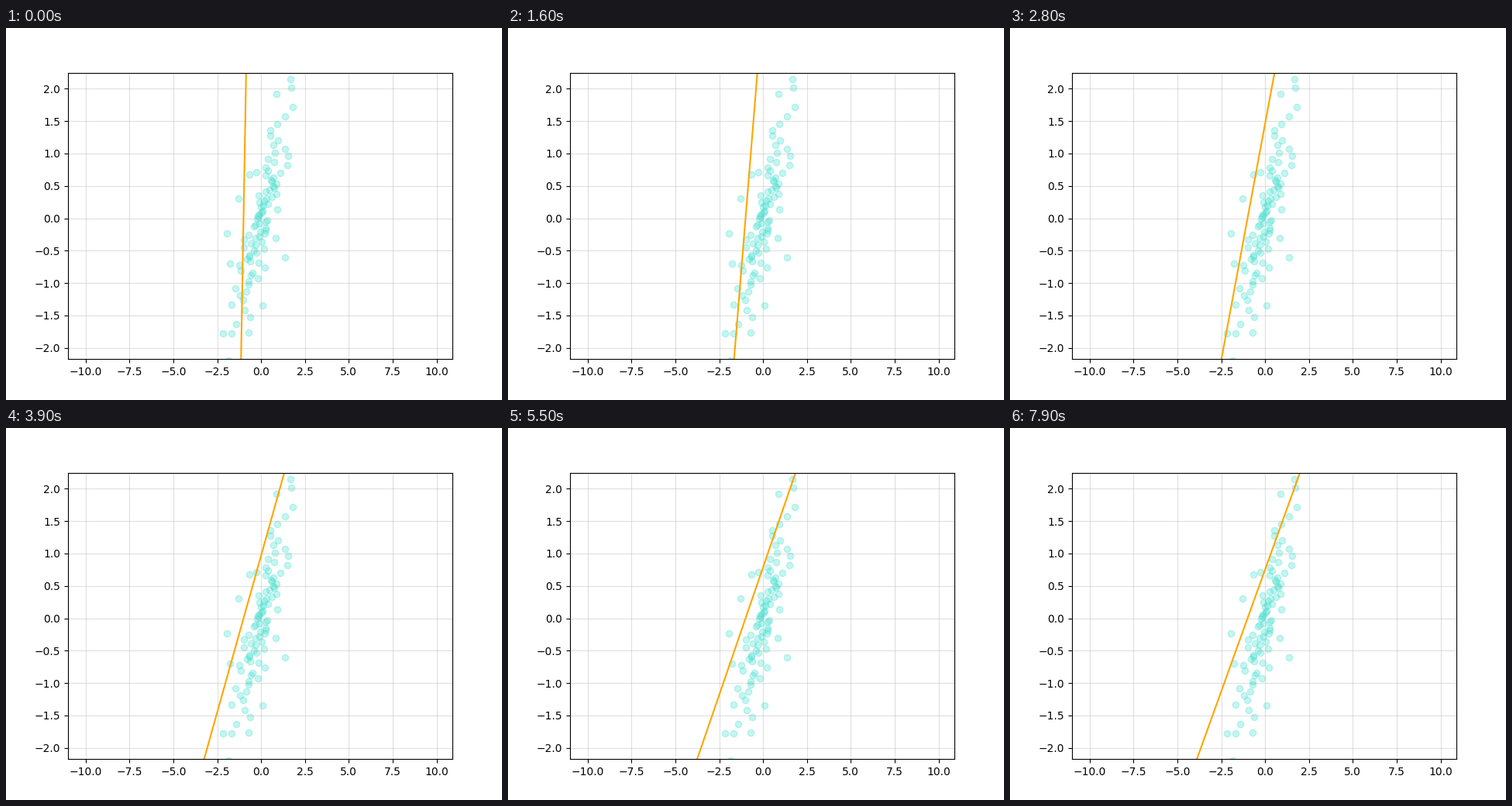
These frames come from a looping animation (640 px wide and 480 px high, 8000 ms). A matplotlib script:

```python
import numpy as np
import matplotlib.pyplot as plt
from matplotlib.animation import FuncAnimation

FRAMES, INTERVAL = 80, 100
START_SLOPE, FINAL_SLOPE, DECAY = 15.2, 0.75, 0.898

# Points at the rim of the cloud
RIM = [
    (1.68, 2.15), (1.72, 2.02), (0.88, 1.92), (-0.27, 0.71),
    (-0.67, 0.68), (-1.28, 0.31), (-1.93, -0.23), (-1.77, -0.70),
    (-2.17, -1.78), (-0.72, -1.76), (0.08, -1.35), (1.37, -0.60),
    (0.84, -0.31), (-1.85, -2.19),
]


def make_cloud(count=83, seed=4):
    """Heights follow logistic quantiles; x scatters about a linear trend."""
    rng = np.random.default_rng(seed)
    p = np.linspace(0.04, 0.96, count)
    y = 0.55 * np.log(p / (1 - p)) - 0.03
    x = 0.85 * y + 0.05 + rng.normal(0, 0.36, count)
    return np.vstack([RIM, np.column_stack([x, y])])


def fit_line(step):
    slope = FINAL_SLOPE + (START_SLOPE - FINAL_SLOPE) * DECAY ** step
    return slope * (xs + 1)


fig, ax = plt.subplots(figsize=(6.4, 4.8), dpi=100)
xs = np.arange(-10, 10, 0.1)
ax.set_xlim(-11, 10.9)
ax.set_ylim(-2.173, 2.249)
ax.grid(color="#b0b0b0", alpha=0.4)
ax.scatter(*make_cloud().T, color="turquoise", alpha=0.3)
line, = ax.plot(xs, fit_line(0), color="orange", scalex=False, scaley=False)


def update(step):
    line.set_ydata(fit_line(step))
    return line,


anim = FuncAnimation(fig, update, frames=FRAMES, interval=INTERVAL,
                     repeat=True, repeat_delay=0)
plt.show()
```
